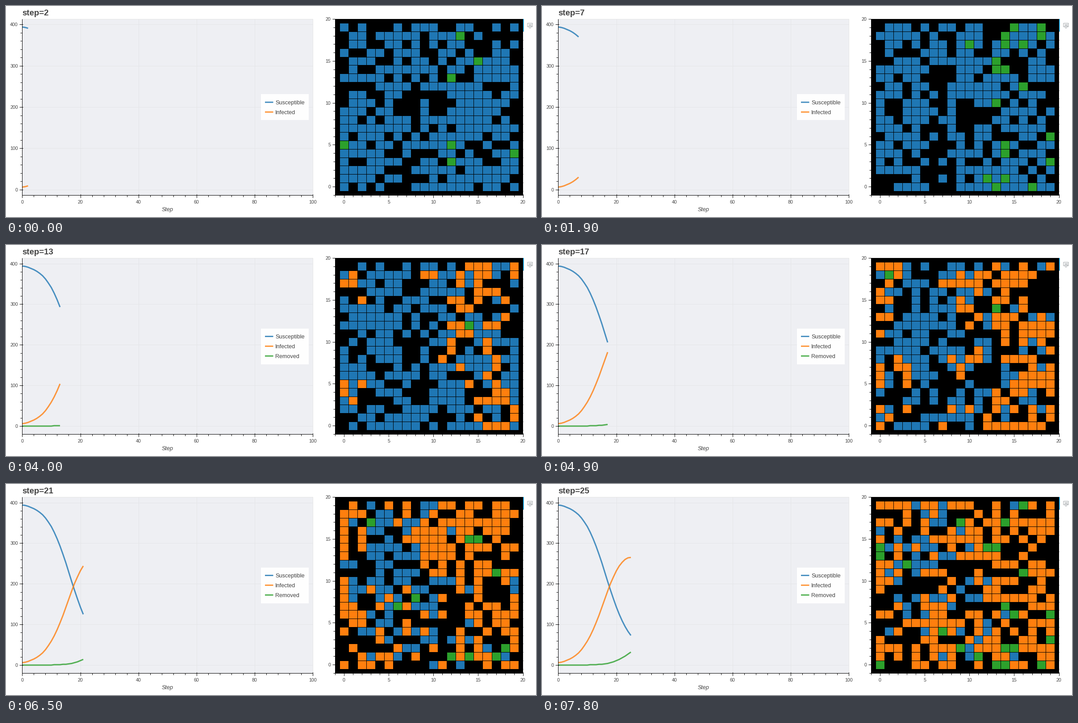
These frames come from a looping animation (1187x472 px, 8000 ms). A matplotlib script:

```python
import numpy as np
import matplotlib.pyplot as plt
from matplotlib.animation import FuncAnimation
from matplotlib.collections import LineCollection
from matplotlib.colors import ListedColormap
from matplotlib.patches import Rectangle

W, H, DPI = 1187, 472, 100
PX = 72 / DPI                      # points per pixel
BLUE, ORANGE, GREEN = "#1f77b4", "#ff7f0e", "#2ca02c"
GREY = "#444444"
TOP, BOTTOM = 29.1, 423.0
LEFT, RIGHT = 36.4, 687.0          # chart
GRID_L, GRID_R = 737.0, 1157.6     # agent grid
N, AGENTS, LAST = 20, 400, 25

# The chart moves on at these times (ms); some steps are never shown.
TIMES = [0, 300, 600, 900, 1200, 1900, 2400, 2700, 3100, 3200, 3500, 4300,
         4500, 4900, 5300, 5600, 6500, 7000, 7300, 7800]
SHOWN = [s for s in range(2, LAST + 1) if s not in (10, 14, 20, 22)]
GRID_LAG = {13: 500, 16: 400, 19: 400, 24: 200}
RESCALE = 2700
FIRST_CASES = [(13, 18), (15, 15), (12, 13), (12, 5), (0, 5), (19, 4), (12, 3)]


def epidemic():
    """Logistic spread through a few key points, with slow power-law losses."""
    t = np.arange(LAST + 1)
    key_t = np.array([0, 7, 11, 14, 17, 20, 25])
    key_n = np.array([6, 29, 74, 131, 193, 253, 328])
    fit = np.polyfit(key_t, np.log(key_n / (AGENTS - key_n)), 3)
    caught = np.rint(AGENTS / (1 + np.exp(-np.polyval(fit, t)))).astype(int)
    removed = (t >= 11) + np.rint(31 * (np.maximum(t - 11, 0) / 14) ** 2.6).astype(int)
    gone = np.rint(30 * (np.maximum(t - 9, 0) / 16) ** 2).astype(int)
    return caught, removed, gone


CAUGHT, REMOVED, GONE = epidemic()
SERIES = [("Susceptible", AGENTS - CAUGHT, BLUE),
          ("Infected", CAUGHT - REMOVED - GONE, ORANGE),
          ("Removed", REMOVED, GREEN)]


def simulate():
    """Random walkers on a torus; the nearest susceptibles catch the infection."""
    rng = np.random.default_rng(11)
    pos = rng.integers(0, N, (AGENTS, 2))
    state = np.ones(AGENTS, int)   # 0 gone, 1 susceptible, 2 infected, 3 removed
    state[-CAUGHT[2]:] = 2
    pos[-CAUGHT[2]:] = np.resize(FIRST_CASES, (CAUGHT[2], 2))
    grids = {}
    for step in range(2, LAST + 1):
        if step > 2:
            new, cured, lost = (c[step] - c[step - 1] for c in (CAUGHT, REMOVED, GONE))
            pos = (pos + rng.integers(-1, 2, pos.shape)) % N
            sick, well = np.flatnonzero(state == 2), np.flatnonzero(state == 1)
            gap = np.abs(pos[well][:, None] - pos[sick][None])
            dist = np.minimum(gap, N - gap).max(2).min(1) + 3 * rng.random(len(well))
            out = rng.choice(sick, cured + lost, replace=False)
            state[well[np.argsort(dist)[:new]]] = 2
            state[out[:cured]] = 3
            state[out[cured:]] = 0
        grid = np.zeros((N, N), int)
        for (x, y), s in zip(pos, state):
            if s:
                grid[y, x] = s
        grids[step] = grid
    return grids


fig = plt.figure(figsize=(W / DPI, H / DPI), dpi=DPI, facecolor="white")
plt.rcParams["font.family"] = "Liberation Sans"
ax = fig.add_axes([0, 0, 1, 1])
ax.axis("off")


def text(x, y, s, size, **kw):
    kw = {"color": GREY, "va": "baseline", "zorder": 6, **kw}
    return ax.text(x, y, s, fontsize=size * PX, **kw)


def line(x, y, color, width=1, **kw):
    return ax.plot(x, y, color=color, lw=width * PX, solid_capstyle="butt", **kw)[0]


def segments(segs=(), color="black", zorder=5):
    return ax.add_collection(LineCollection(segs, colors=color, linewidths=PX,
                                            zorder=zorder))


def box(x, y, w, h, color, **kw):
    return ax.add_patch(Rectangle((x, y), w, h, fc=color, lw=0, **kw))


def x_ticks(places, major):
    return [[(x, BOTTOM - 2 * m), (x, BOTTOM + (6 if m else 4))]
            for x, m in zip(places, major)]


def y_ticks(left, places, major):
    return [[(left + 2 * m, y), (left - (6 if m else 4), y)]
            for y, m in zip(places, major)]


def chart_x(v):
    return LEFT + (RIGHT - LEFT) * np.asarray(v) / 100


def chart_y(v, low):
    high = SERIES[0][1][0]
    pad = (high - low) * 0.05
    return BOTTOM - (BOTTOM - TOP) * (np.asarray(v) - low + pad) / (high - low + 2 * pad)


def grid_x(v):
    return GRID_L + (GRID_R - GRID_L) * (np.asarray(v) + 1) / (N + 1)


def grid_y(v):
    return BOTTOM - (BOTTOM - TOP) * (np.asarray(v) + 1) / (N + 1)


# chart
box(LEFT, TOP, RIGHT - LEFT, BOTTOM - TOP, "#eeeff3", zorder=0)
line([LEFT, RIGHT, RIGHT], [TOP, TOP, BOTTOM], "#e5e5e5", zorder=1)
for v in range(20, 100, 20):
    line([chart_x(v)] * 2, [TOP, BOTTOM], "#e4e5e8", zorder=1)
line([LEFT, LEFT, RIGHT], [TOP, BOTTOM, BOTTOM], "black", zorder=5)
steps = np.arange(0, 101, 4)
segments(x_ticks(chart_x(steps), steps % 20 == 0))
for v in range(0, 101, 20):
    text(chart_x(v), 441.5, str(v), 10.67, ha="center")
text(362, 459, "Step", 12.6, ha="center", style="italic")
title = text(36.5, 21, "", 18.7, weight="bold")
levels = np.arange(0, 401, 20)
y_marks, y_grid = segments(), segments(color="#e4e5e8", zorder=1)
y_labels = [text(26.8, 0, str(v), 10.67, ha="right") for v in levels[::5]]
curves = [line([], [], c, 3, alpha=0.8, solid_joinstyle="bevel", zorder=3)
          for _, _, c in SERIES]

# legend
panel = box(570.5, 0, 107, 0, "white", alpha=0.95, zorder=4)
keys = [line([580, 598.5], [0, 0], c, 3, alpha=0.8, zorder=6, snap=False)
        for _, _, c in SERIES]
names = [text(603, 0, name, 12.6) for name, _, _ in SERIES]

# agent grid
edge = np.arange(N + 1) - 0.5
box(GRID_L, TOP, GRID_R - GRID_L, BOTTOM - TOP, "black", zorder=0)
cells = ax.pcolormesh(grid_x(edge), grid_y(edge), np.zeros((N, N)),
                      cmap=ListedColormap(["black", BLUE, ORANGE, GREEN]),
                      vmin=-0.5, vmax=3.5, zorder=2)
for x, y in zip(grid_x(edge), grid_y(edge)):
    line([x, x], [TOP, BOTTOM], "black", zorder=3)
    line([GRID_L, GRID_R], [y, y], "black", zorder=3)
line([GRID_L, GRID_L, GRID_R], [TOP, BOTTOM, BOTTOM], "black", zorder=5)
units = np.arange(-1, N + 1)
fives = units % 5 == 0
segments(x_ticks(grid_x(units), fives))
segments(y_ticks(GRID_L, grid_y(units), fives))
for v in range(0, N + 1, 5):
    text(grid_x(v), 441.5, str(v), 10.67, ha="center")
    text(727, grid_y(v) + 4, str(v), 10.67, ha="right")

# toolbar
box(1158, 29, 2, 28, "#26aae1", zorder=6)
line([1168, 1179, 1179, 1176, 1173.5, 1171, 1168, 1168],
     [38.5, 38.5, 46.5, 46.5, 50, 46.5, 46.5, 38.5], "#a1a6a9", zorder=6)
for y in (40.5, 42.5, 44.5):
    line([1170, 1177], [y, y], "#a1a6a9", zorder=6)

ax.set_xlim(0, W)
ax.set_ylim(H, 0)
GRIDS = simulate()


def step_at(t, lag):
    return max(s for start, s in zip(TIMES, SHOWN) if start + lag.get(s, 0) <= t)


def draw(frame):
    t = frame * 100
    step = step_at(t, {})
    three = t >= RESCALE
    low = 0 if three else CAUGHT[0]
    title.set_text(f"step={step}")

    ys = chart_y(levels, low)
    y_marks.set_segments(y_ticks(LEFT, ys, levels % 100 == 0))
    y_grid.set_segments([[(LEFT, y), (RIGHT, y)] for y in ys[::5]])
    for label, y in zip(y_labels, ys[::5]):
        label.set_y(y + 4)

    top = 186.5 if three else 197.3
    panel.set_y(top)
    panel.set_height(80 if three else 58)
    for i, (_, data, _) in enumerate(SERIES):
        y = top + 18 + 21.9 * i
        curves[i].set_data(chart_x(np.arange(step + 1)), chart_y(data[:step + 1], low))
        keys[i].set_ydata([y, y])
        names[i].set_y(y + 4.3)
        for artist in (curves[i], keys[i], names[i]):
            artist.set_visible(three or i < 2)

    grid = GRIDS[step_at(t, GRID_LAG)]
    # with only two states present the palette's last colour marks infection
    cells.set_array(grid if three else np.where(grid == 2, 3, grid))
    return []


anim = FuncAnimation(fig, draw, frames=80, interval=100, repeat=True,
                     repeat_delay=0, blit=False)
plt.show()
```
